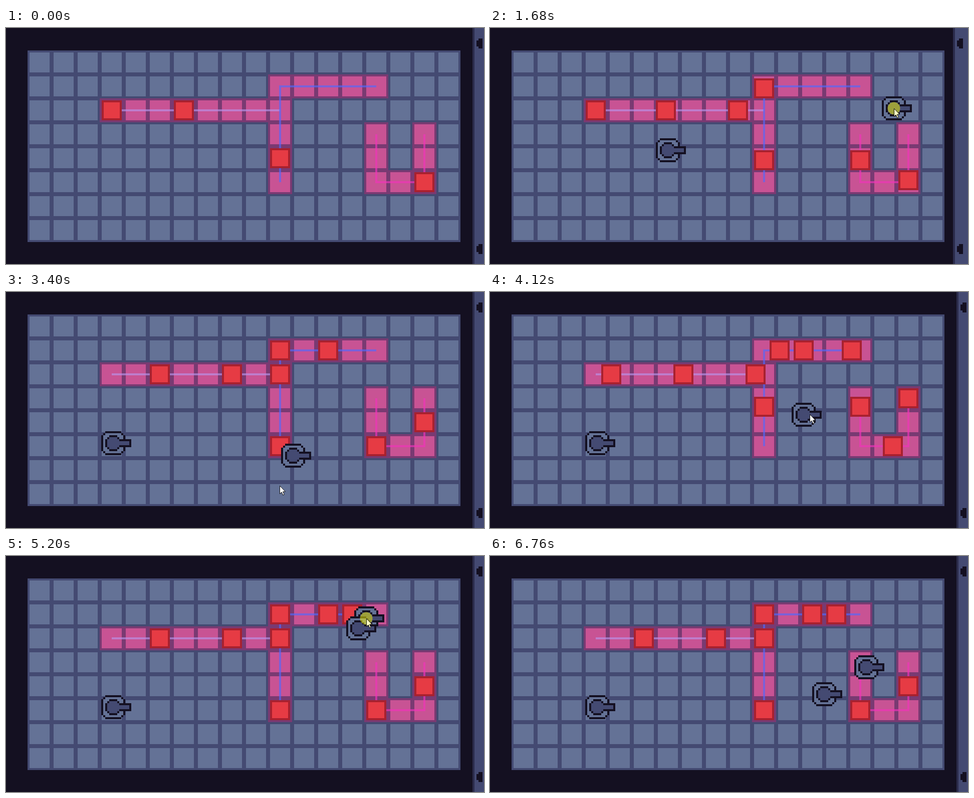
Animation of 954x473 px, one loop 7000 ms. Source, as an HTML page with a canvas:

```html
<!DOCTYPE html>
<html lang="en">
<head>
<meta charset="utf-8">
<title>Tower grid</title>
<style>
html, body { margin: 0; width: 100%; height: 100%; overflow: hidden; background: #141021; }
canvas { display: block; width: 954px; height: 473px; }
</style>
</head>
<body>
<canvas id="stage" width="954" height="473"></canvas>
<script>
const ctx = document.getElementById('stage').getContext('2d');
const LOOP = 7000, FRAME = 40;
const COLS = 18, ROWS = 8, CELL = 48;
const DARK = '#141021', NAVY = '#444a72', TILE = '#647296';

// Enemies hop one cell per beat and settle exponentially.
const FIRST_BEAT = 385.6, BEAT = 618.4, SETTLE = 23, SPAWN_EVERY = 3;

const center = ([col, row]) => [67 + CELL * col, 69 + CELL * row];

// Expand corner cells into every cell along the route.
function route(...corners) {
  const cells = [corners[0]];
  for (const [col, row] of corners.slice(1)) {
    let [c, r] = cells[cells.length - 1];
    while (c !== col || r !== row) {
      c += Math.sign(col - c);
      r += Math.sign(row - r);
      cells.push([c, r]);
    }
  }
  return cells;
}

const feeder = route([3, 2], [10, 2]);
const trunk = route([10, 5], [10, 1], [14, 1]);
const hook = route([16, 3], [16, 5], [14, 5], [14, 3]);

// "first" is the beat at which the earliest enemy spawned.
const lanes = [
  { color: '#b994eb', first: -3, line: feeder, cells: feeder.concat(trunk.slice(4)) },
  { color: '#5069ff', first: -1, line: trunk, cells: trunk },
  { color: '#f134bc', first: -2, line: hook, cells: hook }
];

// New towers are picked up at the shelf; later drags start where the tower stands.
const SHELF = [916, 180];
const standing = {};
const drags = [
  [0, 480, 1040, [355, 245]],
  [1, 1460, 1880, [711, 145]],
  [1, 2480, 2680, [573, 328]],
  [0, 2840, 3000, [214, 303]],
  [1, 3620, 4080, [626, 246]],
  [1, 4160, 4280, [703, 145]],
  [2, 4500, 5200, [719, 125]],
  [1, 5440, 5800, [667, 277]],
  [2, 6060, 6480, [751, 223]]
].map(([tower, press, release, to]) => {
  const isNew = !standing[tower];
  const from = standing[tower] || SHELF;
  standing[tower] = to;
  return { tower, press, release, from, to, isNew };
});

const ENTER = 120;
const pointerStops = [
  { at: ENTER, pos: [960, 300] },
  { at: 2240, pos: [367, 290] },
  { at: 3400, pos: [546, 388] },
  { at: 4120, pos: [638, 245] },
  { at: 6760, pos: [880, 480] },
  ...drags.flatMap(d => [{ at: d.press, pos: d.from }, { at: d.release, pos: d.to }])
].sort((a, b) => a.at - b.at);

const clamp = v => Math.min(1, Math.max(0, v));

function pointerAt(t) {
  const next = pointerStops.findIndex(s => s.at > t);
  if (next < 0) return pointerStops[pointerStops.length - 1].pos;
  const a = pointerStops[Math.max(0, next - 1)], b = pointerStops[next];
  const u = clamp((t - a.at) / (b.at - a.at));
  const ease = u * u * (3 - 2 * u);
  return a.pos.map((v, k) => Math.round(v + (b.pos[k] - v) * ease));
}

function box(color, x, y, w, h = w) {
  ctx.fillStyle = color;
  ctx.fillRect(x, y, w, h);
}

const square = (color, [x, y], size) => box(color, x - size / 2, y - size / 2, size);

function drawBoard() {
  box(DARK, 0, 0, 954, 473);
  box(NAVY, 43, 45, COLS * CELL, ROWS * CELL);
  for (let row = 0; row < ROWS; row++) {
    for (let col = 0; col < COLS; col++) square(TILE, center([col, row]), 40);
  }
  const spots = lanes.flatMap(lane => lane.cells.map(center));
  for (const spot of spots) square('#793a72', spot, CELL);
  for (const spot of spots) square('#c85394', spot, 40);
  ctx.lineWidth = 4;
  ctx.globalAlpha = .65;
  for (const lane of lanes) {
    ctx.strokeStyle = lane.color;
    ctx.beginPath();
    lane.line.map(center).forEach(p => ctx.lineTo(...p));
    ctx.stroke();
  }
  ctx.globalAlpha = 1;
}

function drawEnemies(t) {
  const beat = Math.floor((t - FIRST_BEAT) / BEAT);
  const age = t - FIRST_BEAT - beat * BEAT;
  const hop = 1 - Math.exp(-age / SETTLE);
  for (const { cells, first } of lanes) {
    for (let born = first; born <= beat + 1; born += SPAWN_EVERY) {
      const i = beat + 1 - born;
      if (i >= cells.length) continue;
      const to = center(cells[i]), from = center(cells[Math.max(0, i - 1)]);
      const spot = to.map((v, k) => Math.round(from[k] + (v - from[k]) * hop));
      square('#a8212f', spot, 40);
      square('#e63b44', spot, 32);
    }
  }
}

// The panel slides out around each pick-up from the shelf.
function drawPanel(t) {
  const open = drags.filter(d => d.isNew).map(d => clamp((240 - Math.abs(t - d.press)) / 140));
  const x = 931 - Math.round(48 * Math.max(...open));
  box('#2b2c4c', x, 0, 4, 473);
  box(NAVY, x + 4, 0, 954 - x, 473);
  for (const y of [21, 433]) {
    box(DARK, x + 12, y, 8, 20);
    box(DARK, x + 8, y + 4, 4, 12);
  }
}

// Stepped disc on a 4 px pixel grid with a one-pixel outline.
function pixelDisc(x, y, half, fill) {
  const size = 2 * half;
  box(DARK, x - half + 8, y - half, size - 16, size);
  box(DARK, x - half + 4, y - half + 4, size - 8);
  box(DARK, x - half, y - half + 8, size, size - 16);
  box(fill, x - half + 8, y - half + 4, size - 16, size - 8);
  box(fill, x - half + 4, y - half + 8, size - 8, size - 16);
}

function drawTower(x, y) {
  pixelDisc(x, y, 24, TILE);
  pixelDisc(x, y, 16, NAVY);
  box(DARK, x + 12, y - 8, 24, 16);
  box(NAVY, x + 8, y - 4, 24, 8);
}

function drawPointer(x, y, pressed) {
  if (pressed) {
    ctx.fillStyle = 'rgba(255,255,0,.48)';
    ctx.beginPath();
    ctx.arc(x, y, 12.5, 0, 2 * Math.PI);
    ctx.fill();
  }
  const shape = [[0, 0], [0, 16], [3.6, 12.6], [6.2, 18.6], [8.8, 17.5], [6.2, 11.6], [11, 11.6]];
  ctx.beginPath();
  shape.forEach(([dx, dy]) => ctx.lineTo(x + dx + .5, y + dy + .5));
  ctx.closePath();
  ctx.fillStyle = pressed ? '#ffffc4' : '#fff';
  ctx.strokeStyle = '#111';
  ctx.lineWidth = 1;
  ctx.fill();
  ctx.stroke();
}

function draw(t) {
  drawBoard();
  drawEnemies(t);
  drawPanel(t);
  for (const tower of [2, 1, 0]) {
    const drag = drags.filter(d => d.tower === tower && d.press <= t).pop();
    if (drag) drawTower(...pointerAt(Math.min(t, drag.release)));
  }
  if (t >= ENTER) {
    const pressed = drags.some(d => d.press <= t && t <= d.release);
    drawPointer(...pointerAt(t), pressed);
  }
}

const start = performance.now();
function tick() {
  const t = (performance.now() - start) % LOOP;
  draw(Math.floor(t / FRAME) * FRAME);
  requestAnimationFrame(tick);
}
tick();
</script>
</body>
</html>
```
